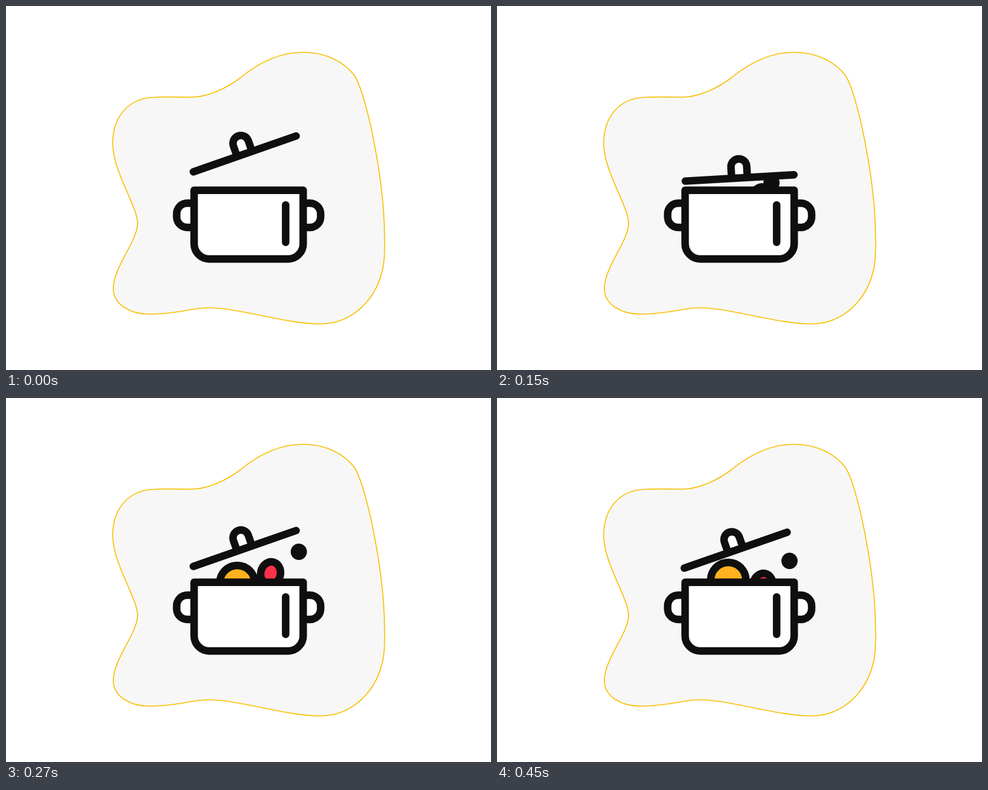
Animation of 800 by 600 pixels, one loop 0.6 s. Source, as an HTML page:

```html
<!DOCTYPE html>
<html lang="en">
<head>
<meta charset="utf-8">
<title>Cooking pot</title>
<style>
  html, body { margin: 0; width: 100%; height: 100%; overflow: hidden; background: #fff; }
  svg { display: block; width: 800px; height: 600px; }
  .ink { stroke: #0f0f0f; stroke-width: 12.4; stroke-linecap: round; stroke-linejoin: round; fill: #fff; }
  #orange { fill: #ffb11f; }
  #red { fill: #fd314b; }
  #dot { fill: #0f0f0f; stroke: none; }
</style>
</head>
<body>
<svg viewBox="0 0 800 600">
  <path fill="#f7f7f7" stroke="#f8bf00" stroke-width="1.6" d="M490 76.3C525 76.3 558 91 575 115C594 144 623 280 624.3 375C625 395 625 417 621.5 433C611 482 573 524 518 524C460 524 383 497 333 497.5C308 497.5 280 508 237 508C205 508 177 492 177 466C177 430 217 388 217 358C217 330 176 273 176 226C176 182 203 151 245 150.5C270 149 290 151 310 150C335 149 365 135 387 118C415 95 450 76.3 490 76.3Z"/>
  <g class="ink">
    <circle id="orange" r="29"/>
    <ellipse id="red" rx="16.3" ry="19"/>
    <circle id="dot" r="13.4"/>
    <g id="pot">
      <path id="handle" d="M310 325H299a17.5 17.5 0 0 0-17.5 17.5v5a17.5 17.5 0 0 0 17.5 17.5H310"/>
      <use href="#handle" transform="matrix(-1 0 0 1 800.5 0)"/>
      <path d="M310.3 303.7H490.2V392a25 25 0 0 1-25 25H335.3a25 25 0 0 1-25-25Z"/>
      <path d="M461.3 328V389.5"/>
    </g>
    <path id="lid" d="M76.5 0v-18.5a13 13 0 0 1 26 0V0M0 0H179.5"/>
  </g>
</svg>
<script>
const progress = (s, from, to) => Math.max(0, Math.min(1, (s - from) / (to - from)));
const easeOut = u => 1 - (1 - u) ** 3;
const easeInOut = u => u < 0.5 ? 2 * u * u : 1 - 2 * (1 - u) ** 2;

function place(id, x, y, angle = 0) {
  document.getElementById(id).setAttribute("transform", `translate(${x} ${y}) rotate(${angle})`);
}

function draw(time) {
  const s = Math.min(15, Math.floor(time % 600 / 30));
  const open = 1 - easeInOut(progress(s, 0, 4)) + easeInOut(progress(s, 4, 7.4));
  const pop = easeOut(progress(s, 4, 9));      // food jumps out
  const settle = easeOut(progress(s, 9, 15));  // and comes to rest
  const dip = Math.sin(Math.PI * settle);
  const shake = -2.5 * Math.sin(Math.PI * 2 * progress(s, 5, 13)) ** 2;

  place("pot", 0, shake);
  place("lid", 311 - 2 * open + dip, 291.3 - open * (18 - 0.47 * s) + 0.6 * shake, -19.2 * open - 1.1 * shake);
  place("orange", 381.5, 365 - 60 * pop - 5 * settle + 12.5 * dip);
  place("red", 436.5 - 1.2 * shake + 2 * settle - 10 * dip, 344 - 55 * pop + 19 * settle, 12);
  place("dot", 424 + 59 * pop - 0.5 * settle - 3 * dip, 327.5 - 74 * pop + 15 * settle);
}

const start = performance.now();
function tick() {
  draw(performance.now() - start);
  requestAnimationFrame(tick);
}
tick();
</script>
</body>
</html>
```
